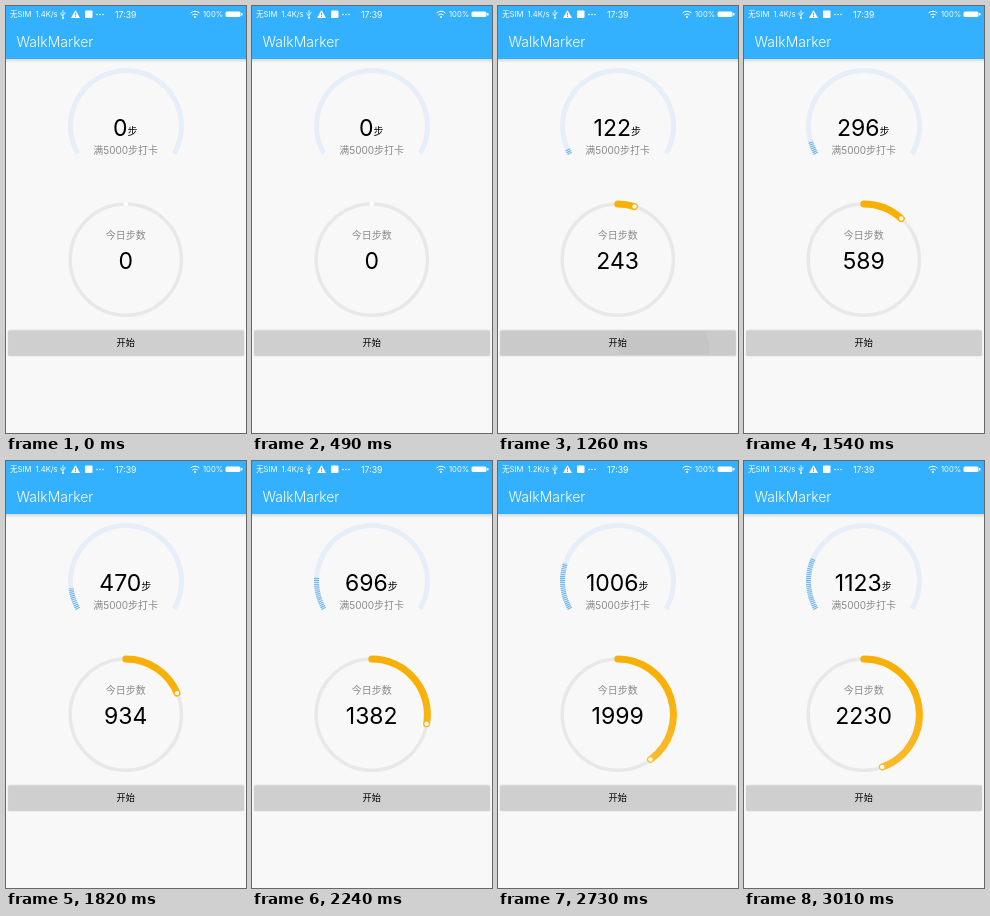
These frames come from a looping animation (240 by 427 pixels, 4060 ms). An HTML page:

```html
<!DOCTYPE html>
<html lang="zh-CN">
<head>
<meta charset="utf-8">
<title>WalkMarker</title>
<style>
html, body { margin: 0; height: 100%; overflow: hidden; background: #f8f8f8; }
svg { display: block; width: 100vw; height: 100vh; }
text { font-family: Inter, "Noto Sans CJK SC", "Noto Sans CJK", sans-serif; }
.mid { text-anchor: middle; }
.num { font-size: 23px; }
.hint { font-size: 10px; fill: #8a8a8a; }
.status { font-size: 7.6px; fill: #fff; }
.line { fill: none; stroke: #fff; }
</style>
</head>
<body>
<svg viewBox="0 0 240 427">
  <defs>
    <linearGradient id="gold" gradientUnits="userSpaceOnUse" x1="0" y1="198" x2="0" y2="310">
      <stop offset=".2" stop-color="#f9b004"/><stop offset="1" stop-color="#f9bb30"/>
    </linearGradient>
    <linearGradient id="shade" x2="0" y2="1">
      <stop stop-color="#d5d9dc"/><stop offset="1" stop-color="#f8f8f8"/>
    </linearGradient>
    <clipPath id="face"><rect x="2.5" y="324.5" width="235" height="24.5" rx="1"/></clipPath>
  </defs>

  <rect width="240" height="427" fill="#f8f8f8"/>
  <rect y="53" width="240" height="4" fill="url(#shade)"/>
  <rect width="240" height="53" fill="#33b0fe"/>
  <text x="10.5" y="41" font-size="14" font-weight="300" fill="#fff">WalkMarker</text>

  <g class="status">
    <text x="4" y="11.3">无SIM</text>
    <text x="29.500" y="11.3" id="speed"></text>
    <text x="109" y="11.700" font-size="8.700">17:39</text>
    <text x="197" y="11.300">100%</text>
    <path class="line" stroke-width=".8" d="M57 4v8M55 6.500v2l2 1.500M59 6v1.500l-2 1.500"/>
    <circle cx="57" cy="12" r="1"/>
    <path d="M69.500 4l4.500 8h-9z"/>
    <path d="M69.500 6.800v2.600M69.500 10v1" stroke="#33b0fe"/>
    <rect x="79" y="4.500" width="7.500" height="7.500" rx="1"/>
    <circle cx="91" cy="8.500" r=".8"/><circle cx="94" cy="8.500" r=".8"/><circle cx="97" cy="8.500" r=".8"/>
    <path class="line" d="M184.500 7q4.500-3.500 9 0M186.300 9q2.700-2 5.400 0"/>
    <circle cx="189" cy="11" r="1"/>
    <rect x="219.500" y="5.500" width="15" height="5.500" rx="1.500"/>
    <rect x="235" y="7" width="1.500" height="2.500"/>
  </g>

  <g fill="none">
    <path id="track" stroke="#e6eefa" stroke-width="5"/>
    <path id="ticks" stroke="#69b2ea" stroke-width="5" stroke-dasharray="1.05 .887"/>
    <circle cx="119.800" cy="253.600" r="55.600" stroke="#e8e8e8" stroke-width="3.500"/>
    <path id="ring" stroke="url(#gold)" stroke-width="7" stroke-linecap="round"/>
  </g>
  <circle id="knob" r="2.200" fill="#fff"/>
  <text class="mid" x="119.300" y="130"><tspan class="num" id="goal"></tspan><tspan font-size="10" dy="-1">步</tspan></text>
  <text class="mid hint" x="119.700" y="148">满5000步打卡</text>
  <text class="mid hint" x="119.800" y="233">今日步数</text>
  <text class="mid num" x="119.700" y="262.800" id="today"></text>

  <rect x="1.500" y="323.500" width="237" height="27" rx="2" fill="#e6e6e6"/>
  <rect x="2" y="325" width="236" height="25" rx="1.500" fill="#d2d2d2"/>
  <g clip-path="url(#face)">
    <rect id="button" x="2" y="324" width="236" height="26" fill="#cfcfcf"/>
    <circle id="ripple" fill="#000"/>
  </g>
  <text class="mid" x="119.700" y="339.800" font-size="9.200">开始</text>
  <circle id="touch" cx="183" cy="347.500" r="6.300" fill="#f5f3ee" fill-opacity=".85" stroke="#eedcb8"/>
</svg>
<script>
const LOOP = 4060, STEP = 70;
const GAUGE = [120, 120, 55.5], RING = [119.8, 253.6, 55.6];
const KEYS = [[1061, 0], [1260, 243], [1820, 934], [2240, 1382], [2730, 1999], [3010, 2230]];
const el = Object.fromEntries([...document.querySelectorAll('[id]')].map(e => [e.id, e]));

const set = (e, attrs) => { for (const k in attrs) e.setAttribute(k, attrs[k]); };
const clamp = x => Math.min(1, Math.max(0, x));

function polar([cx, cy, r], deg) {
  const a = deg * Math.PI / 180;
  return [cx + r * Math.cos(a), cy + r * Math.sin(a)];
}

function arc(circle, from, sweep) {
  if (sweep <= 0) return '';
  const r = circle[2];
  return `M${polar(circle, from)}A${r} ${r} 0 ${+(sweep > 180)} 1 ${polar(circle, from + sweep)}`;
}

function stepsAt(t) {
  let n = 0;
  for (let i = 1; i < KEYS.length; i++) {
    const [t0, a] = KEYS[i - 1], [t1, b] = KEYS[i];
    n += (b - a) * clamp((t - t0) / (t1 - t0));
  }
  return Math.round(n);
}

function draw(t) {
  const today = stepsAt(t), goal = Math.floor(today * .5037);
  el.today.textContent = today;
  el.goal.textContent = goal;
  el.speed.textContent = t < 2520 ? '1.4K/s' : '1.2K/s';

  set(el.ticks, { d: arc(GAUGE, 150, goal / 5000 * 240) });
  const sweep = today / 5000 * 360;
  set(el.ring, { d: arc(RING, -90, sweep) });
  const [cx, cy] = polar(RING, sweep - 90);
  set(el.knob, { cx, cy });

  // Tap feedback
  set(el.touch, { opacity: +(t >= 910 && t < 1050) });
  const p = clamp((t - 1050) / 350), on = t >= 1050 && t < 1400;
  set(el.button, { fill: on ? '#cacaca' : '#cfcfcf' });
  set(el.ripple, { cx: 183 - 28 * p, cy: 347 - 5 * p, r: 75 * p, opacity: on ? .025 : 0 });
}

set(el.track, { d: arc(GAUGE, 150, 240) });
const start = performance.now();
function frame() {
  const t = (performance.now() - start) % LOOP;
  draw(Math.floor(t / STEP) * STEP);
  requestAnimationFrame(frame);
}
frame();
</script>
</body>
</html>
```
